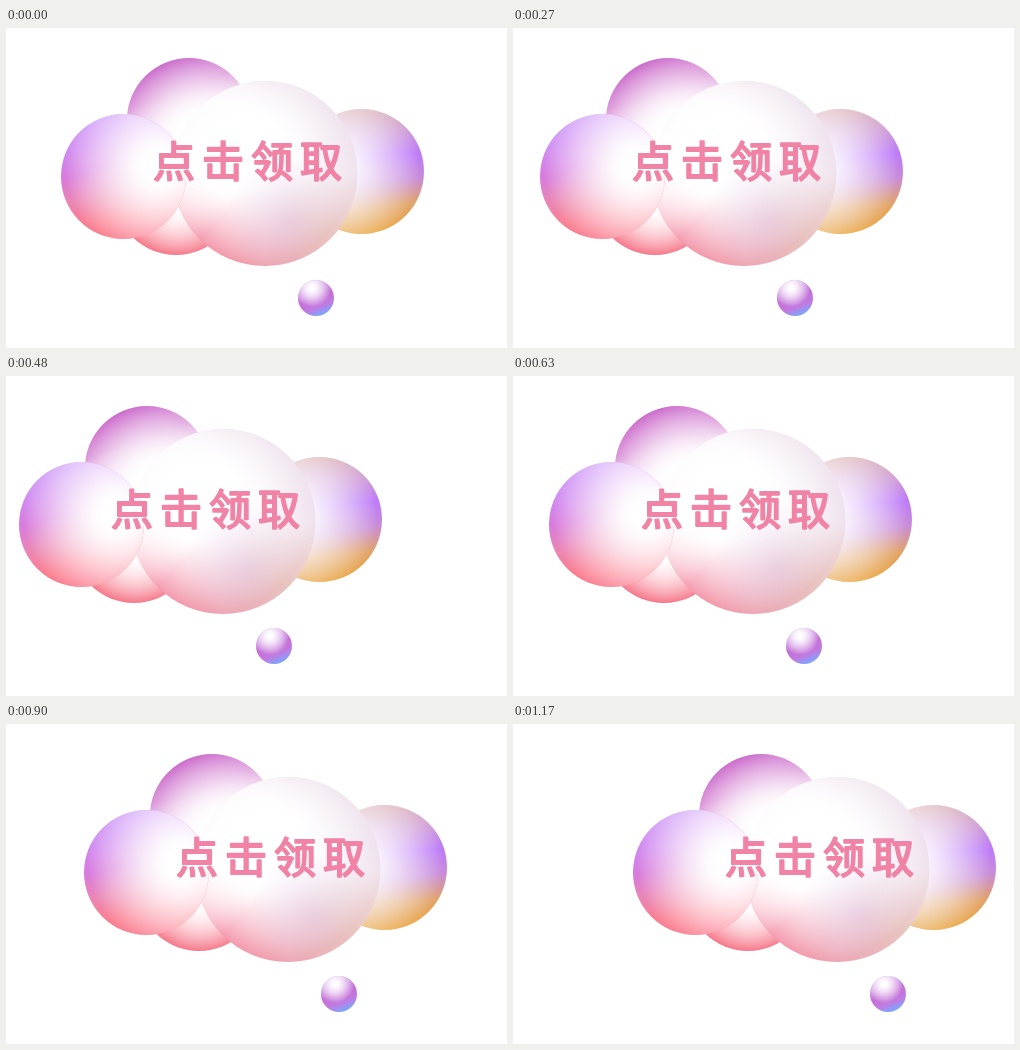
An HTML page with a canvas that plays this animation: 501 by 320 pixels, repeating every 1.84 s.

```html
<!DOCTYPE html>
<html lang="zh">
<head>
<meta charset="utf-8">
<style>
  html, body { margin: 0; width: 100%; height: 100%; overflow: hidden; background: #fff; }
  canvas { display: block; }
</style>
</head>
<body>
<canvas id="stage" width="501" height="320"></canvas>
<script>
const ctx = document.getElementById('stage').getContext('2d');
const LOOP = 1840, STEP = 30, TURN = 15, END = 39;

// Tint stops are spread evenly along an axis (degrees from the right, clockwise).
// The white glow is [x, y, inner radius, outer radius].
const bubbles = [
  { x: 355.5, y: 143.5, r: 62.5, axis: 84, glow: [328, 140, 4, 86],
    tint: ['#dab0b0', '#cf9cd4', '#bd7af8', '#c88cd8', '#e2a468', '#e8a23c'] },
  { x: 170, y: 165, r: 62, axis: 90, glow: [172, 176, 4, 54],
    tint: ['#fff', '#fbc0c8', '#f56c80'] },
  { x: 183, y: 92, r: 62, axis: 70, glow: [196, 112, 22, 90],
    tint: ['#c65cc6', '#d27cd0', '#f0c8e8', '#fff', '#fff'] },
  { x: 259, y: 145.5, r: 92.5, glow: [238, 124, 38, 116],
    rim: ['#efe2ee', '#ecc8bc', '#efa6b0', '#f06c8a', '#fff', '#f6eef6', '#e4cae0', '#e8d8e8'],
    haze: [284, 192, 64, '205,160,220'] },
  { x: 117.5, y: 148.5, r: 62.5, axis: 76, glow: [153, 138, 14, 94],
    tint: ['#cc94f8', '#d088f0', '#d87cdc', '#ea86b4', '#fa7e90', '#fa7084'] },
  { x: 310, y: 270, r: 18, axis: 68, glow: [306, 260, 1, 19],
    tint: ['#c88ce0', '#c47cdc', '#c470d8', '#c27ae0', '#78a8ff'] }
];

function fillDisc({ x, y, r }, paint) {
  ctx.fillStyle = paint;
  ctx.beginPath();
  ctx.arc(x, y, r, 0, Math.PI * 2);
  ctx.fill();
}

function addStops(gradient, colors) {
  colors.forEach((c, i) => gradient.addColorStop(i / (colors.length - 1), c));
  return gradient;
}

function basePaint({ x, y, r, axis, tint, rim }) {
  if (rim) return addStops(ctx.createConicGradient(0, x, y), [...rim, rim[0]]);
  const angle = axis * Math.PI / 180;
  const dx = r * Math.cos(angle), dy = r * Math.sin(angle);
  return addStops(ctx.createLinearGradient(x - dx, y - dy, x + dx, y + dy), tint);
}

function softLight(x, y, inner, outer, rgb, strength, power) {
  const stops = Array.from({ length: 9 }, (_, k) =>
    `rgba(${rgb},${strength * (1 - (k / 8) ** power)})`);
  return addStops(ctx.createRadialGradient(x, y, inner, x, y, outer), stops);
}

function drawBubble(b) {
  fillDisc(b, basePaint(b));
  fillDisc(b, softLight(...b.glow, '255,255,255', 1, 1.5));
  if (b.haze) {
    const [x, y, radius, rgb] = b.haze;
    fillDisc(b, softLight(x, y, 0, radius, rgb, 0.3, 1));
  }
}

function drawLabel() {
  ctx.font = '400 42px "Noto Sans CJK SC", "Noto Sans CJK", sans-serif';
  ctx.textAlign = 'center';
  ctx.fillStyle = ctx.strokeStyle = '#f083a6';
  ctx.lineJoin = 'round';
  ctx.lineWidth = 2;
  [...'点击领取'].forEach((char, i) => {
    const x = 168 + i * 49;
    ctx.fillText(char, x, 149);
    ctx.strokeText(char, x, 149);
  });
}

// Drifts left, then turns and glides right until it rests.
function offsetAt(time) {
  const step = Math.min(END, Math.floor(time / STEP));
  return Math.round(step < TURN
    ? -47 * step / TURN
    : -47 + 112 * (step - TURN) / (END - TURN));
}

function draw(now) {
  ctx.setTransform(1, 0, 0, 1, 0, 0);
  ctx.fillStyle = '#fff';
  ctx.fillRect(0, 0, 501, 320);
  ctx.translate(offsetAt(now % LOOP), 0);
  bubbles.forEach(drawBubble);
  drawLabel();
  requestAnimationFrame(draw);
}
requestAnimationFrame(draw);
</script>
</body>
</html>
```
